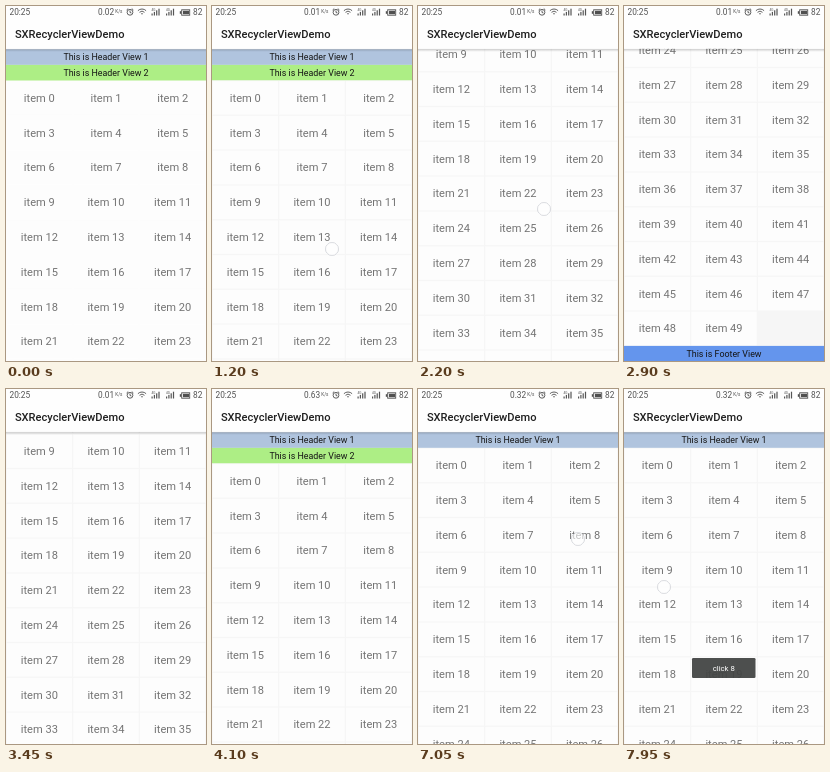
These frames come from a looping animation (200x355 px, 8000 ms). An HTML page with a canvas:

```html
<!DOCTYPE html>
<html lang="en">
<head>
<meta charset="utf-8">
<title>SXRecyclerViewDemo</title>
<style>
html, body { margin: 0; width: 100%; height: 100%; overflow: hidden; background: #fdfdfd; }
canvas { display: block; width: 200px; height: 355px; }
</style>
</head>
<body>
<canvas id="stage"></canvas>
<script>
const W = 200, H = 355, LOOP = 8000;
const BAR = 43.3, HEADER = 15.6, ROW = 34.8, COL = W / 3, ITEMS = 50;
const MAX_SCROLL = 326.2;
const FONT = 'Roboto, "Noto Sans CJK SC", "Noto Sans CJK", sans-serif';

const canvas = document.getElementById('stage');
const ctx = canvas.getContext('2d');
const ratio = window.devicePixelRatio || 1;
canvas.width = W * ratio;
canvas.height = H * ratio;

const clamp = v => Math.max(0, Math.min(1, v));
const progress = (t, from, to) => clamp((t - from) / (to - from));
const ease = {
  linear: p => p,
  in: p => p * p,
  out: p => 1 - (1 - p) ** 2
};

// Each step: end time, scroll offset reached, easing towards it.
const scrollSteps = [
  [1250, 0, 'linear'],
  [1550, 18, 'in'],
  [1700, 65, 'linear'],
  [2100, 144, 'out'],
  [2200, 148, 'in'],
  [2350, 190, 'in'],
  [2700, MAX_SCROLL, 'out'],
  [3100, MAX_SCROLL, 'linear'],
  [3300, 255, 'in'],
  [3850, 0, 'out']
];

function scrollAt(t) {
  let start = 0, offset = 0;
  for (const [end, target, kind] of scrollSteps) {
    if (t < end) return offset + (target - offset) * ease[kind](progress(t, start, end));
    start = end;
    offset = target;
  }
  return offset;
}

// A finger that drags keeps its place on the list.
const touches = [
  { from: 1050, to: 1700, x: 120, y: 243, drag: true },
  { from: 2150, to: 2400, x: 126, y: 351, drag: true },
  { from: 3050, to: 3300, x: 124, y: 466, drag: true },
  { from: 4550, to: 4650, x: 79, y: 71 },
  { from: 6050, to: 6130, x: 79, y: 71 },
  { from: 7000, to: 7100, x: 160, y: 150 },
  { from: 7950, to: 8000, x: 40, y: 198 }
];

const toasts = [
  { from: 4650, to: 6700, x: 12, width: 175, label: 'click Header 2  再次点击删除此Header' },
  { from: 7100, to: 9000, x: 68, width: 63.5, label: 'click 8' }
];

function text(label, x, y, size, color, align = 'center', weight = 400) {
  ctx.font = `${weight} ${size}px ${FONT}`;
  ctx.textAlign = align;
  ctx.fillStyle = color;
  ctx.fillText(label, x, y + size * 0.35);
}

function box(x, y, w, h, color) {
  ctx.fillStyle = color;
  ctx.fillRect(x, y, w, h);
}

function arc(x, y, r, from = 0, to = Math.PI * 2) {
  ctx.beginPath();
  ctx.arc(x, y, r, from, to);
  ctx.stroke();
}

function band(label, y, color) {
  box(0, y, W, HEADER, color);
  text(label, 100, y + HEADER / 2, 8.9, '#151515');
}

function drawList(t, scroll) {
  let y = BAR - scroll;
  band('This is Header View 1', y, '#b0c4de');
  y += HEADER;
  if (t < 6150) {
    band('This is Header View 2', y, '#adee85');
    y += HEADER;
  }
  const rows = Math.ceil(ITEMS / 3);
  ctx.globalAlpha = progress(t, 0, 400);
  box(0, y, W, rows * ROW, '#f6f6f6');
  ctx.globalAlpha = 1;
  for (let i = 0; i < ITEMS; i++) {
    const left = (i % 3) * COL, top = y + Math.floor(i / 3) * ROW;
    if (top > H || top + ROW < BAR) continue;
    box(left + 0.6, top + 0.6, COL - 1.2, ROW - 1.2, '#fdfdfd');
    text('item ' + i, left + COL / 2, top + ROW / 2, 11.1, '#747474');
  }
  band('This is Footer View', y + rows * ROW, '#6495ed');
}

function drawSignal(x) {
  for (let i = 0; i < 4; i++) {
    const h = 2 + i * 1.6;
    box(x + i * 2.3, 9.5 - h, 1.2, h, '#555');
  }
  text('4G', x, 4, 3.2, '#555', 'left');
}

function drawStatus(t) {
  const ink = '#505050';
  const rate = t < 1000 ? '0.02' : t < 4000 ? '0.01' : t < 7000 ? '0.63' : '0.32';
  text('20:25', 3.5, 6.2, 8.3, ink, 'left');
  text(rate, 92, 6.2, 8.3, ink, 'left');
  text('K/s', 109.3, 5.5, 4.6, ink, 'left');

  ctx.strokeStyle = ink;
  ctx.lineWidth = 0.9;
  arc(124, 6.3, 2.9);
  ctx.beginPath();
  ctx.moveTo(124, 4.5);
  ctx.lineTo(124, 6.5);
  ctx.lineTo(125.5, 7);
  ctx.moveTo(120.6, 4);
  ctx.lineTo(122.2, 2.6);
  ctx.moveTo(127.4, 4);
  ctx.lineTo(125.8, 2.6);
  ctx.stroke();

  for (const r of [1.2, 3.5, 5.8]) arc(136, 8.8, r, Math.PI * 1.25, Math.PI * 1.75);
  drawSignal(145.5);
  drawSignal(160);
  box(173.8, 5.2, 1.5, 2.6, ink);
  ctx.strokeRect(175.7, 3.8, 8, 5.4);
  box(177, 4.8, 6, 3.4, ink);
  text('82', 187, 6.2, 8.3, ink, 'left');
}

function drawAppBar(t) {
  const shadow = ctx.createLinearGradient(0, BAR - 0.5, 0, BAR + 2.6);
  shadow.addColorStop(0, 'rgba(0,0,0,.2)');
  shadow.addColorStop(1, 'rgba(0,0,0,0)');
  box(0, BAR - 0.5, W, 3.1, shadow);
  box(0, 0, W, BAR - 0.5, '#fefefe');
  drawStatus(t);
  text('SXRecyclerViewDemo', 8.9, 28.5, 11.1, '#202020', 'left', 500);
}

function drawToast({ from, to, x, width, label }, t) {
  const alpha = progress(t, from, from + 300) * (1 - progress(t, to, to + 250));
  if (!alpha) return;
  ctx.globalAlpha = alpha;
  ctx.fillStyle = 'rgba(66,69,67,.94)';
  ctx.beginPath();
  ctx.roundRect(x, 269, width, 20, 1.3);
  ctx.fill();
  text(label, x + width / 2, 279, 7.78, '#fff');
  ctx.globalAlpha = 1;
}

function drawTouch({ from, to, x, y, drag }, t, scroll) {
  if (t < from || t >= to) return;
  ctx.fillStyle = 'rgba(255,255,255,.6)';
  ctx.strokeStyle = '#c6c8ce';
  ctx.lineWidth = 0.9;
  arc(x, drag ? y - scroll : y, 6.4);
  ctx.fill();
}

function draw(t) {
  const scroll = scrollAt(t);
  ctx.setTransform(ratio, 0, 0, ratio, 0, 0);
  box(0, 0, W, H, '#fdfdfd');
  drawList(t, scroll);
  drawAppBar(t);
  toasts.forEach(toast => drawToast(toast, t));
  touches.forEach(touch => drawTouch(touch, t, scroll));
}

const begin = performance.now();
function tick() {
  draw((performance.now() - begin) % LOOP);
  requestAnimationFrame(tick);
}
tick();
</script>
</body>
</html>
```
